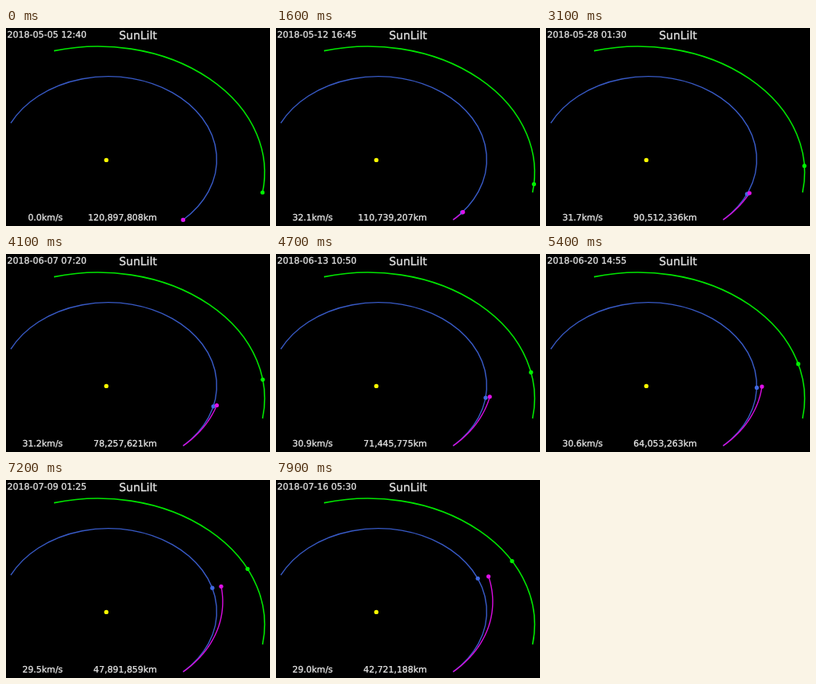
Recreate the animation shown at these times as an HTML page. Size 330 by 248 pixels, loop 8000 ms.

```html
<!DOCTYPE html>
<html lang="en">
<head>
<meta charset="utf-8">
<title>Transfer orbit</title>
<style>
  html, body { margin: 0; width: 100%; height: 100%; overflow: hidden; background: #000; }
  svg { display: block; width: 100vw; height: 100vh; }
  path { fill: none; stroke-width: 1.4; }
  text {
    font: 10.9px "DejaVu Sans", Verdana, sans-serif; text-rendering: geometricPrecision;
    fill: #e6e6e6; stroke: #e6e6e6; stroke-width: 0.3;
  }
  .end { text-anchor: end; }
  #title { font-size: 14px; text-anchor: middle; }
</style>
</head>
<body>
<svg viewBox="0 0 330 248">
  <path id="marsOrbit" stroke="#00e400" style="stroke-width:1.6"/>
  <path id="earthOrbit" stroke="#385ac6"/>
  <path id="trail" stroke="#d80ce0"/>
  <circle cx="125.4" cy="165.4" r="2.7" fill="#ffff00"/>
  <circle id="mars" r="2.6" fill="#00f000"/>
  <circle id="earth" r="2.6" fill="#4169e1"/>
  <circle id="probe" r="2.6" fill="#e010e8"/>
  <text id="date" x="1.5" y="12" style="font-size:11px"></text>
  <text id="title" x="165" y="14">SunLilt</text>
  <text id="speed" class="end" x="71" y="241"></text>
  <text id="distance" class="end" x="188.6" y="241"></text>
</svg>
<script>
const LOOP = 8000, HOLD = 1000, STEP = 100;
const START = Date.UTC(2018, 4, 5, 12, 40), STEP_MINUTES = 1475;
const EARTH = { cx: 127.9, cy: 164.8, rx: 135.6, ry: 104.2 };
const MARS = { cx: 115, cy: 181, rx: 208.3, ry: 158 };

const KEYS = [0, 7, 22, 32, 45, 63, 70];
const SPEEDS = [32.2, 32.1, 31.7, 31.2, 30.6, 29.5, 29.0];
const DISTANCES = [120897808, 110739207, 90512336, 78257621, 64053263, 47891859, 42721188];

const el = id => document.getElementById(id);

function at(orbit, degrees, scale = 1) {
  const a = degrees * Math.PI / 180;
  return [orbit.cx + orbit.rx * scale * Math.cos(a), orbit.cy + orbit.ry * scale * Math.sin(a)];
}

const earthAt = n => at(EARTH, 46.4 - 0.9986 * n);
const marsAt = n => at(MARS, 9.1 - 0.547 * n - 0.0002 * n * n);
const probeAt = n => at(EARTH, 46.4 - 1.073 * n + 0.00125 * n * n, 1 + 0.00038 * n + 0.000015 * n * n);

function arc(orbit, from, to, large) {
  return `M${from} A${orbit.rx} ${orbit.ry} 0 ${large} 0 ${to}`;
}

function linear(values, n) {
  const i = Math.max(1, KEYS.findIndex(k => k >= n));
  const p = (n - KEYS[i - 1]) / (KEYS[i] - KEYS[i - 1]);
  return values[i - 1] + (values[i] - values[i - 1]) * p;
}

// Lagrange polynomial through the known values
function smooth(values, n) {
  return values.reduce((sum, v, i) =>
    sum + KEYS.reduce((w, k, j) => j === i ? w : w * (n - k) / (KEYS[i] - k), v), 0);
}

function place(id, [x, y]) {
  el(id).setAttribute("cx", x);
  el(id).setAttribute("cy", y);
}

function draw(n) {
  place("mars", marsAt(n));
  place("earth", earthAt(n));
  place("probe", probeAt(n));
  const points = Array.from({ length: n + 1 }, (_, i) => probeAt(i).map(v => v.toFixed(2)).join(" "));
  el("trail").setAttribute("d", "M" + points.join("L"));
  const date = new Date(START + n * STEP_MINUTES * 60000);
  el("date").textContent = date.toISOString().slice(0, 16).replace("T", " ");
  el("speed").textContent = (n ? linear(SPEEDS, n) : 0).toFixed(1) + "km/s";
  el("distance").textContent = Math.round(smooth(DISTANCES, n)).toLocaleString("en-US") + "km";
}

el("earthOrbit").setAttribute("d", arc(EARTH, earthAt(0), [6, 119.1], 1));
el("marsOrbit").setAttribute("d", arc(MARS, marsAt(0), [60, 28.6], 0));

const origin = performance.now();
let shown = -1;
function tick() {
  const t = Math.max(0, performance.now() - origin) % LOOP;
  const n = t < HOLD ? 0 : Math.floor((t - HOLD) / STEP) + 1;
  if (n !== shown) draw(shown = n);
  requestAnimationFrame(tick);
}
tick();
</script>
</body>
</html>
```
